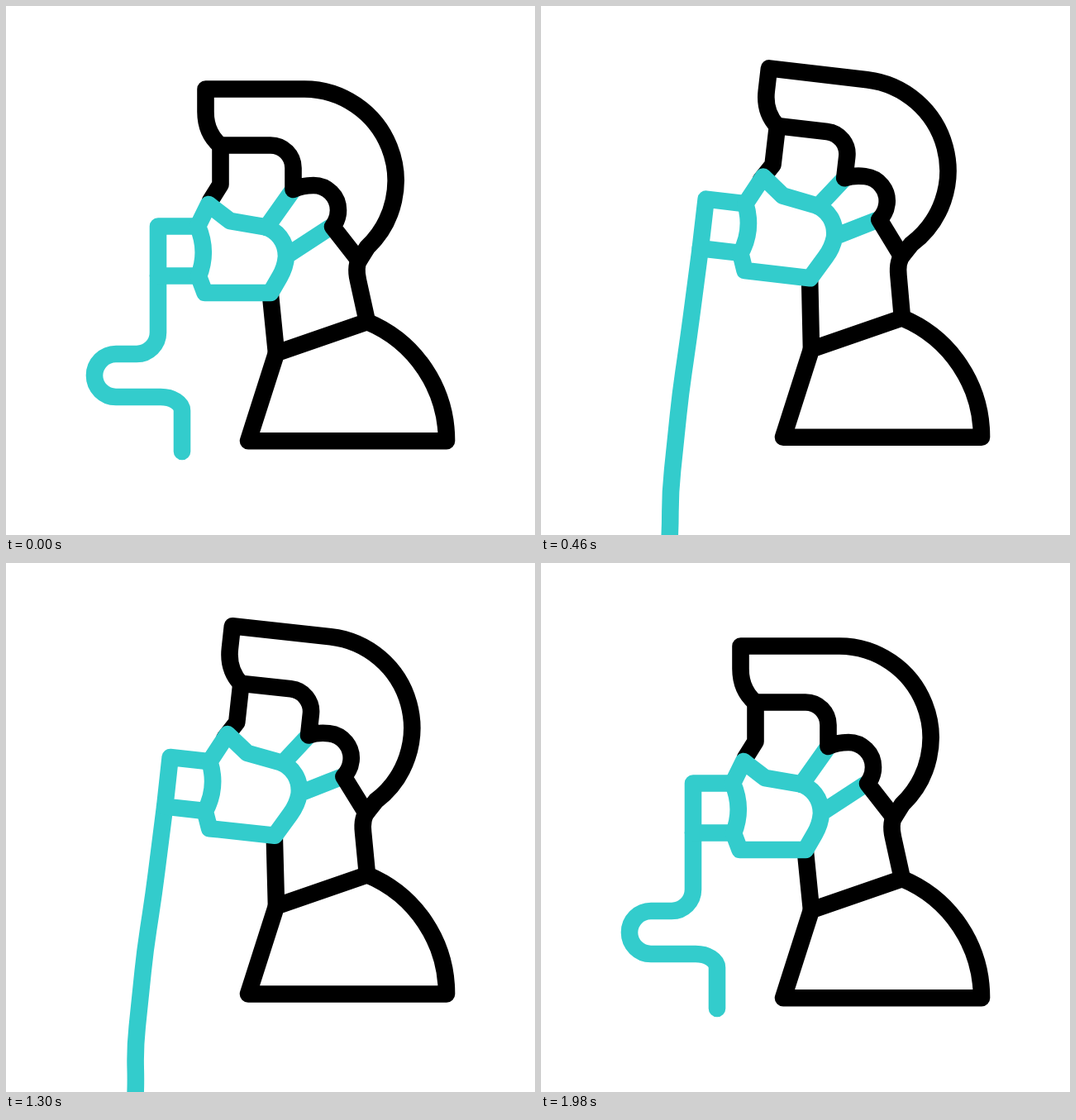
An HTML page that plays this animation: 640x640 px, repeating every 2420 ms.

```html
<!DOCTYPE html>
<html lang="en">
<head>
<meta charset="utf-8">
<title>Breathing mask</title>
<style>
  html, body { margin: 0; width: 100%; height: 100%; overflow: hidden; background: #fff; }
  svg { display: block; width: 100%; height: 100%; }
  path { fill: none; stroke: #000; stroke-width: 20.6; stroke-linecap: round; stroke-linejoin: round; }
  .teal path, path.teal { stroke: #33cccc; }
</style>
</head>
<body>
<svg viewBox="0 0 640 640">
  <path id="neck"/>
  <path id="body" d="M437 382A155.6 155.6 0 0 1 533 526.3H293L327 420Z"/>
  <g class="head">
    <path d="M259.500 168V216L247 236"/>
  </g>
  <path id="tube" class="teal"/>
  <g class="head teal">
    <path d="M232 266.500H184V326.500H233"/>
    <path id="mask"/>
  </g>
  <g class="head">
    <path d="M259 168.500C248 159 241.500 145 241.500 128V100.500H361A111 111 0 0 1 437 292L427 308L395 267Q402 258 402 247A30 30 0 0 0 372 217Q358 217 347.500 222V196A27.500 27.500 0 0 0 320 168.500Z"/>
  </g>
</svg>
<script>
  const LOOP = 2420, EXHALE = 1000, REST = 1980;
  const PIVOT = [436, 388];
  const byId = id => document.getElementById(id);
  const heads = document.querySelectorAll('.head');

  const mix = (a, b, k) => a + (b - a) * k;
  const fmt = p => p.map(n => n.toFixed(2)).join(' ');

  // S-curve from 0 to 1 that passes one half at time `half`
  const surge = (t, half, power) => t <= 0 ? 0 : 1 / (1 + (half / t) ** power);

  // Rises after the loop starts, falls after the exhale starts
  const breath = (t, inHalf, inPower, outHalf, outPower) =>
    t >= REST ? 0 : surge(t, inHalf, inPower) * (1 - surge(t - EXHALE, outHalf, outPower));

  // Tube corners: slack x, slack y, and height on the taut tube
  const corners = [[184, 421, 400], [107, 421, 470], [107, 473, 590], [213, 473, 640], [213, 506, 680], [213, 539, 705]];

  function tautX(y) {
    const d = 640 - y;
    return 153 + 0.085 * d + 0.00009 * d * d;
  }

  // Polyline with softly rounded corners
  function rounded(points, radius) {
    let d = `M${fmt(points[0])}`;
    for (let i = 1; i < points.length - 1; i++) {
      const c = points[i];
      const toward = (p, length) => {
        const size = Math.hypot(p[0] - c[0], p[1] - c[1]);
        const k = Math.min(length / size, length / radius / 2);
        return [mix(c[0], p[0], k), mix(c[1], p[1], k)];
      };
      const [before, after] = [points[i - 1], points[i + 1]];
      d += `L${fmt(toward(before, radius))}C${fmt(toward(before, radius * 0.45))} `
        + `${fmt(toward(after, radius * 0.45))} ${fmt(toward(after, radius))}`;
    }
    return d + `L${fmt(points[points.length - 1])}`;
  }

  function tubePath(start, pull) {
    const points = corners.map(([x, y, tautY], i) => {
      const bulge = i === 3 || i === 4 ? 100 * pull * (1 - pull) : 0;
      return [mix(x, tautX(tautY), pull) + bulge, mix(y, tautY, pull)];
    });
    return rounded([start, ...points], 26);
  }

  // The upper and right side of the mask swells with each breath
  function maskPath(swell) {
    const q = (x, y) => fmt([x + 5 * swell, y - 9 * swell]);
    return `M232 266.500Q245 297 233 327L240.500 347H320L${q(331, 328)}`
      + `Q${q(338, 316)} ${q(339, 303)}C${q(339, 285)} ${q(328, 271)} ${q(312, 267)}`
      + `L${q(271, 260)}L${q(245, 240)}Z`
      + `M${q(315, 268)}L345.500 225M${q(342, 300.5)}L391 268.500`;
  }

  function draw(now) {
    const t = now % LOOP;
    const angle = 7.1 * breath(t, 168, 2.6, 397, 7.3);
    const lift = 5 * breath(t, 280, 5, 470, 8);
    const pull = breath(t, 177, 4, 470, 8);

    const cos = Math.cos(angle * Math.PI / 180), sin = Math.sin(angle * Math.PI / 180);
    const onHead = (x, y) => {
      const dx = x - PIVOT[0], dy = y - PIVOT[1];
      return [PIVOT[0] + dx * cos - dy * sin, PIVOT[1] + dx * sin + dy * cos - lift];
    };
    const h = (x, y) => fmt(onHead(x, y));

    for (const g of heads) g.setAttribute('transform', `translate(0 ${-lift}) rotate(${angle} ${PIVOT.join(' ')})`);
    byId('body').setAttribute('transform', `translate(0 ${-lift})`);
    byId('neck').setAttribute('d',
      `M${h(320, 350)}L327 ${420 - lift}M${h(429, 304)}C${h(424, 311)} ${h(423, 319)} ${h(426, 332)}L437 ${382 - lift}`);
    byId('mask').setAttribute('d', maskPath(lift / 5));
    byId('tube').setAttribute('d', tubePath(onHead(184, 326), pull));
  }

  const begin = performance.now();
  function tick() {
    draw(performance.now() - begin);
    requestAnimationFrame(tick);
  }
  tick();
</script>
</body>
</html>
```
